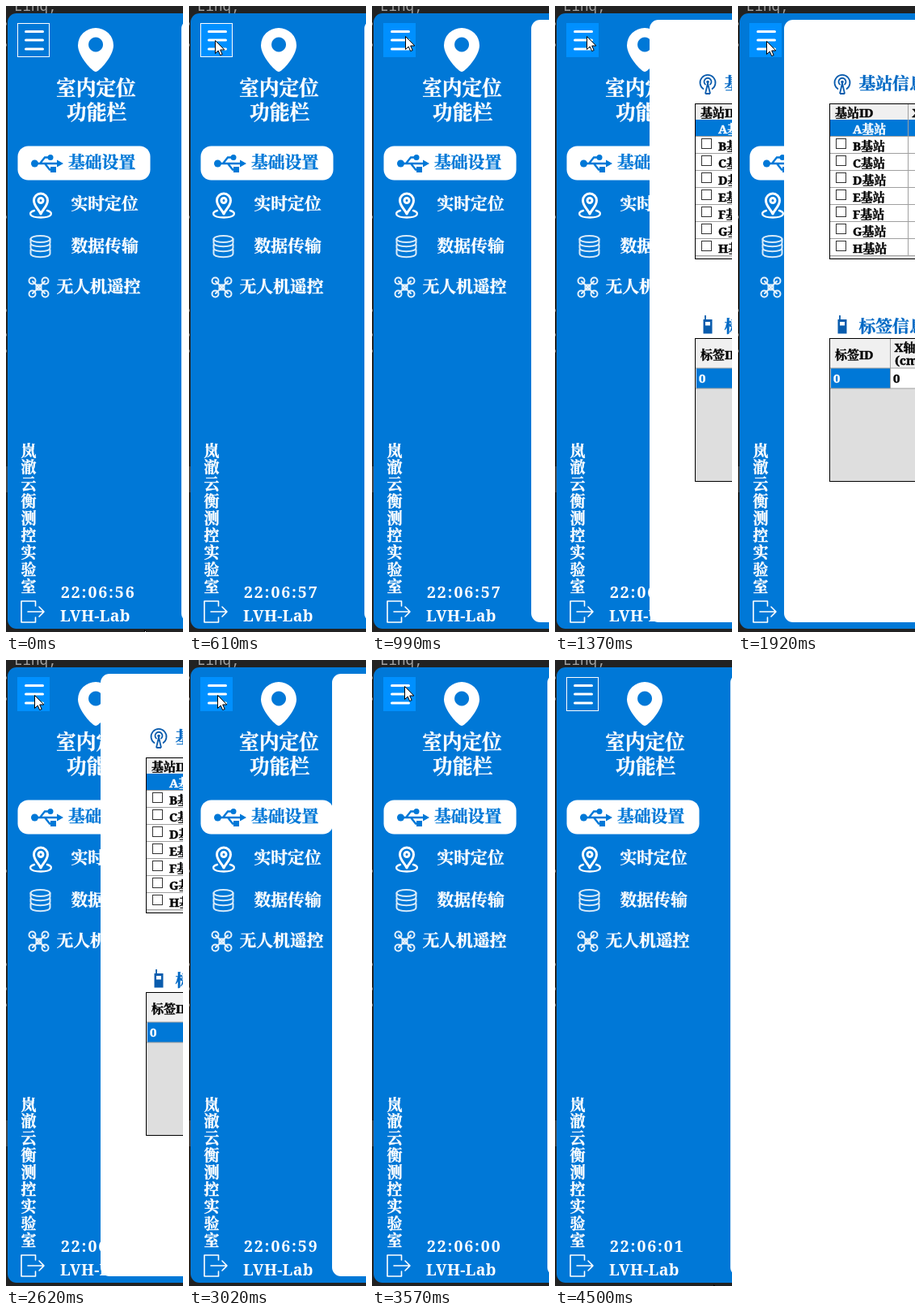
Recreate the animation shown at these times as an HTML page. Size 219 by 771 pixels, loop 4.58 s.

```html
<!DOCTYPE html>
<html lang="zh-CN">
<head>
<meta charset="utf-8">
<title>室内定位功能栏</title>
<style>
  html, body { margin: 0; width: 100%; height: 100%; overflow: hidden; background: #222; }
  body { position: relative; }
  svg { display: block; }
  text, .lab {
    font-family: "Noto Serif", "Noto Serif CJK SC", "Noto Sans CJK SC", serif;
    font-weight: 700;
  }
  text { fill: currentColor; }
  .title, .item, .cell { stroke: currentColor; stroke-width: .4px; }
  .title { font-size: 24.7px; }
  .item { font-size: 20.8px; }
  .cell { font-size: 15px; }
  .clock { font-size: 19.5px; letter-spacing: 1.9px; }
  .name { font-size: 19.5px; letter-spacing: .3px; }
  .code { font: 17.5px "Noto Sans Mono", monospace; }
  .line { fill: none; stroke: #fff; stroke-width: 2; stroke-linecap: round; stroke-linejoin: round; }
  .lab {
    position: absolute; left: 18.5px; top: 537.5px; width: 19px;
    font-size: 19px; line-height: 20.9px; color: #fff; word-break: break-all;
    -webkit-text-stroke: .4px;
  }

  #panel, #face, #edge, #seconds, #cursor { animation: 4580ms step-end infinite; }
  #panel { animation-name: slide; }
  #face { animation-name: face; }
  #edge { animation-name: edge; }
  #seconds { animation-name: tick; }
  #cursor { animation-name: point; }

  @keyframes slide {
    0%, 69.21% { transform: translateX(217px); }
    21.61%, 67.68% { transform: translateX(197px); }
    23.36%, 65.93% { transform: translateX(177px); }
    26.63%, 62.66% { transform: translateX(157px); }
    28.38%, 60.91% { transform: translateX(137px); }
    29.91%, 57.2% { transform: translateX(117px); }
    33.62%, 55.67% { transform: translateX(97px); }
    35.37%, 53.93% { transform: translateX(77px); }
    38.64% { transform: translateX(57px); }
    100% { transform: translateX(217px); }
  }
  @keyframes face {
    0%, 79.69%, 100% { fill: #0078d7; }
    11.57%, 19.86%, 50.65% { fill: #0090ff; }
    16.59%, 48.9% { fill: #0a98ff; }
  }
  @keyframes edge {
    0%, 98.25%, 100% { opacity: 1; }
    16.59% { opacity: 0; }
  }
  @keyframes tick {
    0% { transform: translateY(0); }
    3.27% { transform: translateY(-26px); }
    26.63% { transform: translateY(-52px); }
    45.85% { transform: translateY(-78px); }
    67.68% { transform: translateY(-104px); }
    89.73%, 100% { transform: translateY(-130px); }
  }
  @keyframes point {
    0% { transform: translate(171px, 768px); }
    1.52% { transform: translate(146px, 700px); }
    3.27% { transform: translate(112px, 570px); }
    5.02% { transform: translate(72px, 420px); }
    6.76% { transform: translate(34px, 270px); }
    8.29% { transform: translate(8px, 150px); }
    10.04% { transform: translate(-1px, 80px); }
    11.57% { transform: translate(22px, 43px); }
    13.31% { transform: translate(32px, 42px); }
    15.06% { transform: translate(38px, 39px); }
    16.59% { transform: translate(41px, 37px); }
    28.38% { transform: translate(39px, 37px); }
    40.39% { transform: translate(37px, 40px); }
    41.92% { transform: translate(35px, 43px); }
    77.94% { transform: translate(40px, 32px); }
    79.69% { transform: translate(96px, 16px); }
    81.22% { transform: translate(193px, 1px); }
    82.96% { transform: translate(240px, -40px); }
    87.99% { transform: translate(211px, 742px); }
    89.73% { transform: translate(201px, 746px); }
    91.48% { transform: translate(197px, 753px); }
    93.44% { transform: translate(196px, 760px); }
    98.25%, 100% { transform: translate(196px, 769px); }
  }
</style>
</head>
<body>
<svg width="219" height="771" viewBox="0 0 219 771">
  <defs>
    <clipPath id="sheet"><rect y="17" width="400" height="742" rx="11"/></clipPath>
  </defs>

  <!-- editor behind the window -->
  <rect width="219" height="771" fill="#222"/>
  <text class="code" x="-11" y="6" color="#a0a0a0">s Linq;</text>
  <path d="M0 567h2v32h-2z" fill="#444"/>
  <path d="M0 22h1M0 48h1M0 260h1M0 375h1M0 405h1M0 425h1" stroke="#888" stroke-width="3"/>

  <!-- sidebar -->
  <rect x="2" y="9" width="300" height="758" rx="11" fill="#0078d7"/>
  <rect id="face" x="14" y="21" width="40" height="42" fill="#0078d7"/>
  <rect id="edge" x="14.5" y="21.5" width="39" height="41" fill="none" stroke="#fff"/>
  <path class="line" style="stroke-width:3" d="M24.5 31.5h21M24.5 42h21M24.5 53h21"/>

  <path fill="#fff" fill-rule="evenodd" d="M111 81C107 81 89 62 89 48.500a22 21.500 0 0 1 44 0C133 62 115 81 111 81zM111 38.500a9 9 0 1 0 .1 0z"/>
  <rect x="14.5" y="172.5" width="164" height="42" rx="13" fill="#fff"/>
  <g color="#fff">
    <text class="title" x="62" y="110">室内定位</text>
    <text class="title" x="75" y="140">功能栏</text>
    <text class="item" x="77" y="199.5" color="#0078d7">基础设置</text>
    <text class="item" x="80.5" y="251">实时定位</text>
    <text class="item" x="80.5" y="302.5">数据传输</text>
    <text class="item" x="62.5" y="352.5">无人机遥控</text>
    <text class="name" x="67" y="758">LVH-Lab</text>
  </g>

  <!-- USB -->
  <g fill="#0078d7">
    <path d="M35 194H65M42 194L48 186.5H54M48 194L54 201.5H58" fill="none" stroke="#0078d7" stroke-width="2.4"/>
    <circle cx="35.5" cy="194" r="4.5"/>
    <circle cx="55" cy="186.5" r="3.5"/>
    <path d="M55 198h7v7h-7zM63 189.5L71 194L63 198.5z"/>
  </g>

  <!-- place -->
  <g class="line" style="stroke-width:3">
    <path d="M43 256C40 250 34.5 246 34.5 239.5a8.5 8.5 0 0 1 17 0C51.500 246 46 250 43 256z"/>
    <circle cx="43" cy="239.5" r="3"/>
    <path style="stroke-width:2.4" d="M35 252C27 254 28 260.500 43 260.500S59 254 51 252"/>
  </g>

  <!-- data store -->
  <g class="line" style="opacity:.85">
    <ellipse cx="42.5" cy="287" rx="12" ry="4"/>
    <path d="M30.5 287v5c0 5.5 24 5.5 24 0v-5M30.5 294v4c0 5.5 24 5.5 24 0v-4M30.5 300v5c0 5.5 24 5.5 24 0v-5"/>
  </g>

  <!-- drone -->
  <g class="line" style="opacity:.9">
    <circle cx="32.5" cy="338.5" r="4"/>
    <circle cx="48.5" cy="338.5" r="4"/>
    <circle cx="32.5" cy="354.5" r="4"/>
    <circle cx="48.5" cy="354.5" r="4"/>
    <path d="M33 339L48 354M48 339L33 354M37.5 343.5h6v6h-6z"/>
  </g>

  <!-- exit -->
  <path class="line" style="stroke-width:1.6" d="M36.5 739V733H19V759H36.5V753M27 746H47M41 740L47 746L41 752"/>

  <svg x="68" y="708" width="110" height="26">
    <text id="seconds" class="clock" color="#fff"></text>
  </svg>

  <!-- sliding page -->
  <g id="panel"><g clip-path="url(#sheet)">
    <rect y="17" width="400" height="742" fill="#fff"/>
    <g fill="none" stroke="#0a5cad" stroke-width="1.8">
      <path d="M67 102.5a9.5 9.5 0 1 1 10 0M69.5 97a4.5 4.5 0 1 1 5 0M72 95L69 108M72 95L75 108M69 108h6"/>
      <path d="M69 381v6"/>
    </g>
    <circle cx="72" cy="93.5" r="1.8" fill="#0a5cad"/>
    <path fill="#0a5cad" fill-rule="evenodd" d="M66.5 386h11v17.5h-11zM69 389v4.5h6v-4.5z"/>
    <g color="#0068c4">
      <text class="item" x="92.5" y="103">基站信息</text>
      <text class="item" x="92.5" y="401.5">标签信息</text>
    </g>

    <rect x="56.5" y="120.5" width="320" height="191" fill="#e0e0e0" stroke="#000"/>
    <rect x="57" y="121" width="319" height="19" fill="#f0f0f0"/>
    <text class="cell" x="63" y="136.5">基站ID</text>
    <text class="cell" x="158.5" y="136.5">X轴</text>
    <g id="rows"></g>
    <path d="M153.5 121V308" stroke="#a0a0a0"/>

    <rect x="56.5" y="409.5" width="320" height="176" fill="#dedede" stroke="#000"/>
    <path d="M57 410h319v36h-319z" fill="#f0f0f0"/>
    <path d="M131 446h245v25h-245z" fill="#fff"/>
    <path d="M58 446h73v25h-73z" fill="#0078d7"/>
    <path d="M57 446H376M57 471H376M131.5 410V471" stroke="#a0a0a0"/>
    <text class="cell" x="63" y="434.5">标签ID</text>
    <text class="cell" x="136.5" y="426">X轴</text>
    <text class="cell" x="137" y="441.5">(cm)</text>
    <text class="cell" x="61" y="464" color="#fff">0</text>
    <text class="cell" x="135" y="464">0</text>
  </g></g>

  <path id="cursor" d="M.5.5V16.5L4.2 13L6.7 18.6L9.2 17.5L6.7 12H11.8z" fill="#fff" stroke="#000"/>
</svg>
<div class="lab">岚澈云衡测控实验室</div>

<script>
  const byId = id => document.getElementById(id);

  byId("seconds").innerHTML = ["06:56", "06:57", "06:58", "06:59", "06:00", "06:01"]
    .map((time, i) => `<tspan x="0" y="${21 + i * 26}">22:${time}</tspan>`).join("");

  byId("rows").innerHTML = [..."ABCDEFGH"].map((letter, i) => {
    const y = 140 + i * 21;
    const chosen = i === 0;
    const fill = chosen ? "#0078d7" : "#fff";
    const box = chosen ? "" :
      `<rect x="64.5" y="${y + 2.5}" width="12" height="12" fill="#fff" stroke="#333"/>`;
    return `<rect x="57" y="${y}" width="319" height="21" fill="${fill}"/>
      <path d="M57 ${y + 20.5}H376" stroke="#a0a0a0"/>${box}
      <text class="cell" x="85" y="${y + 16.5}" color="${chosen ? "#fff" : "#000"}">${letter}基站</text>`;
  }).join("");
</script>
</body>
</html>
```
